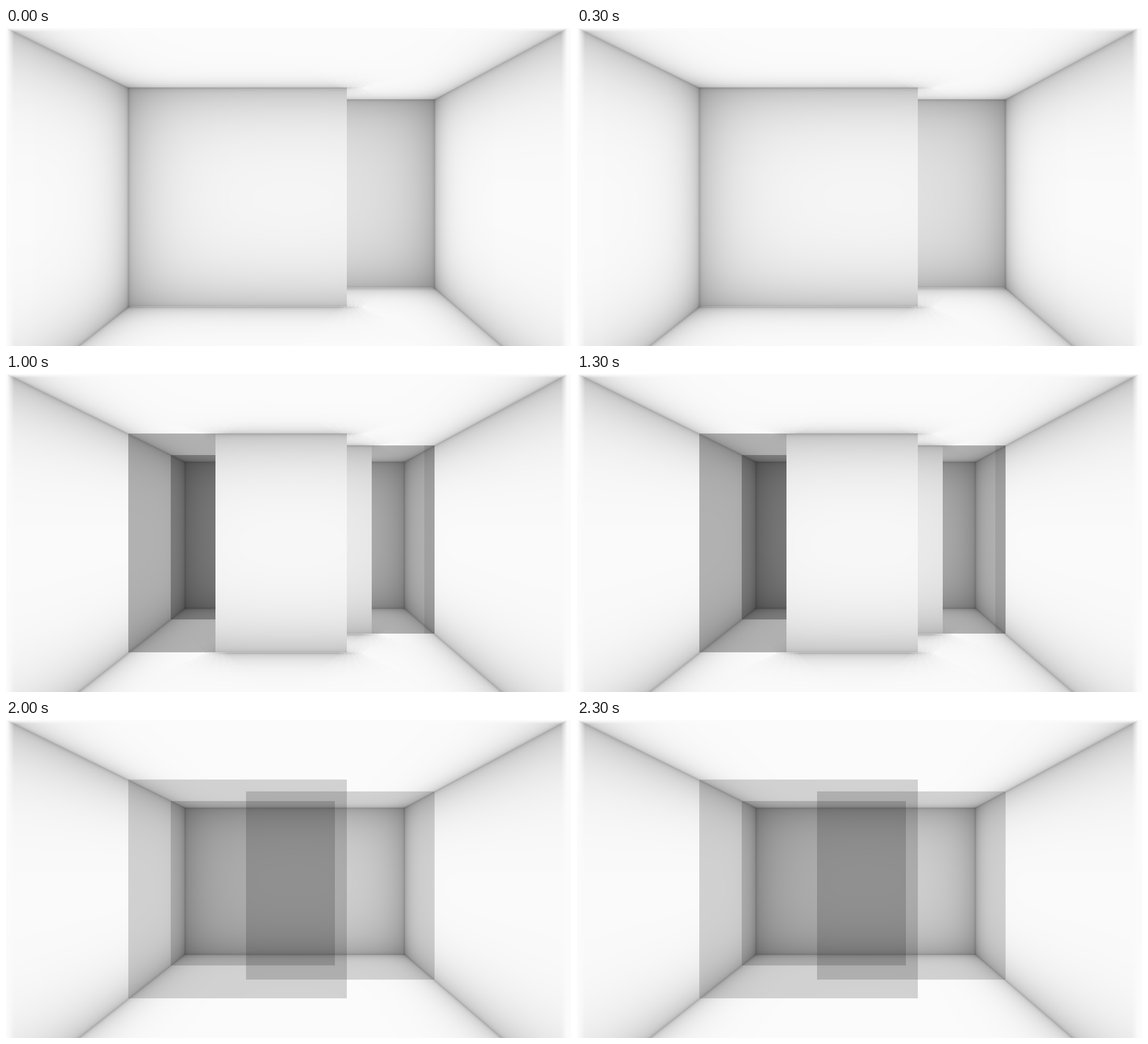
Animation, 998 px wide and 561 px high, one loop 2500 ms. Source, as an HTML page with a canvas:

```html
<!DOCTYPE html>
<html lang="en">
<head>
<meta charset="utf-8">
<title>Sliding panels in a white room</title>
<style>
html, body { margin: 0; width: 100%; height: 100%; overflow: hidden; background: #fbfbfb; }
canvas { display: block; }
</style>
</head>
<body>
<canvas id="stage" width="998" height="561"></canvas>
<script>
const W = 998, H = 561, STEP = 500, GRID = 15;
const ctx = document.getElementById('stage').getContext('2d');

// Room in units of the back wall, seen from a vanishing point.
const VX = 518.4, VY = 254.6, FOCAL = 500, NEAR = 2.55;
const LEFT = -202.4, RIGHT = 185.6, TOP = -99.6, BOTTOM = 159.4;

// Panels from front to back; scale is the perspective size of their plane.
const panels = [
  { x: 216, y: 105.5, w: 386, h: 385.5, scale: 1.494 },
  { x: 424, y: 126.5, w: 333, h: 332, scale: 1.288 },
  { x: 291, y: 143, w: 290, h: 290, scale: 1.121 }
];

// First closed row per column while the panels build up from below.
const stair = c => c < 5 ? 6 : c < 7 ? 7 : c < 9 ? 8 : c < 11 ? 9 : 10;
const firstRow = [stair, c => 16 - stair(c), c => Math.min(7, stair(c))];
const rowDim = [0, .08, .17, .25, .3, .34, .29, .24, .18, .16];

function stairDim(p, c, r) {
  if (p !== 1 && r >= 5 && r < 6) {
    if (c < 1) return .54;
    if (p === 2 && c < 2) return .37;
  }
  return rowDim[r | 0] || 0;
}

// solid: which cells of a panel are closed; dim: darkness of the open ones.
const scenes = [
  { solid: () => true, dim: () => 0, tone: [.99, .91, 1] },
  { solid: (p, c) => p === 1 ? c >= 5 : c < 11, dim: () => .18, tone: [1, 1, .9] },
  { solid: (p, c) => p === 1 ? c < 10 : c >= 6,
    dim: (p, c) => p === 1 && c > 14.2 ? .35 : .29, tone: [1, .95, 1] },
  { solid: (p, c, r) => r >= firstRow[p](c), dim: stairDim, tone: [1, .99, 1] },
  { solid: () => false, dim: () => .165, tone: [1, 1, 1] }
];

const clamp = (v, lo, hi) => Math.min(hi, Math.max(lo, v));

// Light left at distance d from an edge: a wide falloff and a thin crease.
function edge(d, amount, reach, crease = .12) {
  d = Math.max(0, d);
  return 1 - amount * Math.exp(-d / reach) - crease * Math.exp(-d / 1.8);
}

const faceEdge = d => edge(d, .22, 36);

function faceLight(X, Y) {
  return faceEdge(X - LEFT) * faceEdge(RIGHT - X) * faceEdge(Y - TOP) * faceEdge(BOTTOM - Y);
}

// Share of a panel's rim that is closed around a point on a wall.
function rimCover(scene, p, X, Y, sideWall, spread) {
  const q = panels[p];
  let hits = 0;
  for (let i = -3; i <= 3; i++) {
    const x = sideWall ? X : clamp(X + i * spread, LEFT, RIGHT);
    const y = sideWall ? clamp(Y + i * spread, TOP, BOTTOM) : Y;
    const c = (VX + x * q.scale - q.x) / q.w * GRID;
    const r = (VY + y * q.scale - q.y) / q.h * GRID;
    if (c < -.3 || c > GRID + .3) continue;
    if (scene.solid(p, clamp(c, 0, 14.99), clamp(r, 0, 14.99))) hits++;
  }
  return hits / 7;
}

function wallLight(scene, X, Y, s, sideWall) {
  const amount = sideWall ? .22 : .19, reach = sideWall ? 28 : 21;
  let light = sideWall
    ? edge(Y - TOP, amount, reach) * edge(BOTTOM - Y, amount, reach)
    : edge(X - LEFT, amount, reach) * edge(RIGHT - X, amount, reach);
  light *= edge(FOCAL * (1 - 1 / s), amount, reach);
  panels.forEach((q, p) => {
    const d = Math.abs(FOCAL * (1 / q.scale - 1 / s));
    if (d > 120) return;
    const cover = rimCover(scene, p, X, Y, sideWall, 4 + d * .25);
    if (cover) light *= edge(d, amount * cover, reach, .12 * cover);
  });
  // The room is open at the front, so its shading ends there.
  return 1 - (1 - light) * clamp((NEAR - s) / .06, 0, 1);
}

function lightAt(scene, x, y) {
  const dx = x - VX, dy = y - VY;
  let dimming = 1;
  for (let p = 0; p < panels.length; p++) {
    const q = panels[p];
    const c = (x - q.x) / q.w * GRID, r = (y - q.y) / q.h * GRID;
    if (c < 0 || r < 0 || c >= GRID || r >= GRID) continue;
    if (scene.solid(p, c, r)) {
      return dimming * scene.tone[p] * faceLight(dx / q.scale, dy / q.scale);
    }
    dimming *= 1 - scene.dim(p, c, r);
  }
  const sx = Math.max(dx / LEFT, dx / RIGHT), sy = Math.max(dy / TOP, dy / BOTTOM);
  const s = Math.max(1, sx, sy), X = dx / s, Y = dy / s;
  return dimming * (s === 1 ? faceLight(X, Y) : wallLight(scene, X, Y, s, sx > sy));
}

function render(scene) {
  const image = new ImageData(W, H);
  const pixels = new Uint32Array(image.data.buffer);
  for (let y = 0, i = 0; y < H; y++) {
    for (let x = 0; x < W; x++, i++) {
      const v = Math.round(251 * lightAt(scene, x + .5, y + .5));
      pixels[i] = 0xff000000 | v * 0x010101;
    }
  }
  return image;
}

const images = scenes.map(render);
const start = performance.now();
let shown = -1;

function draw() {
  const now = Math.floor((performance.now() - start) / STEP) % images.length;
  if (now !== shown) ctx.putImageData(images[shown = now], 0, 0);
  requestAnimationFrame(draw);
}
draw();
</script>
</body>
</html>
```
